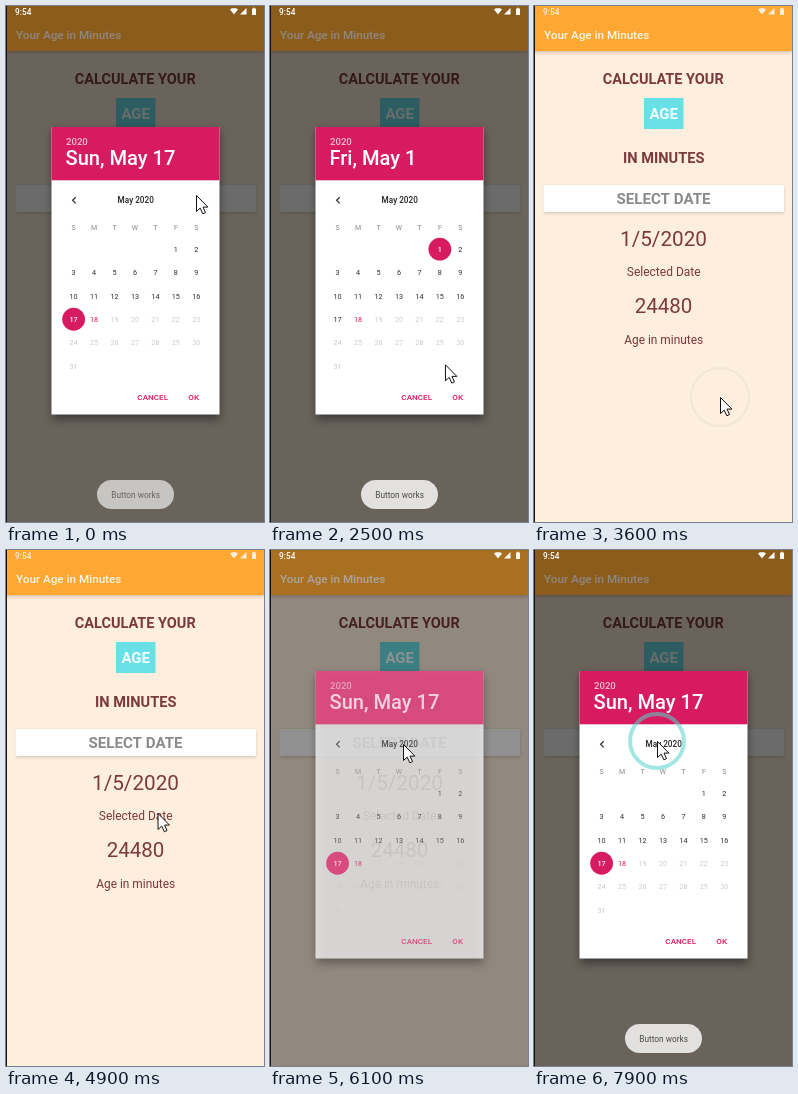
Recreate the animation shown at these times as an HTML page with a canvas. Size 258 by 516 pixels, loop 8000 ms.

```html
<!DOCTYPE html>
<html lang="en">
<head>
<meta charset="utf-8">
<title>Your Age in Minutes</title>
<style>
  html, body { margin: 0; width: 100%; height: 100%; overflow: hidden; background: #feeedd; }
  canvas { display: block; width: 258px; height: 516px; }
</style>
</head>
<body>
<canvas id="stage" width="258" height="516"></canvas>
<script>
const ctx = document.getElementById('stage').getContext('2d');
const LOOP = 8000, PINK = '#d81b60', MAROON = '#7b3a3c';

// Cursor stops: time, x, y
const cursorPath = [
  [0, 190, 189], [400, 200, 113], [850, 192, 176], [1250, 169, 224], [1380, 169, 224],
  [1500, 169, 238], [2100, 169, 238], [2520, 175, 359], [2780, 198, 382], [3000, 186, 391],
  [4450, 186, 391], [5200, 133, 194], [6250, 133, 194], [6600, 90, 219], [6800, 65, 222],
  [7150, 98, 204], [7500, 123, 191], [8000, 123, 191]
];
const clicks = [1720, 3150, 5350, 7850];

const ramp = (t, from, to) => Math.max(0, Math.min(1, (t - from) / (to - from)));
const ease = p => p * p * (3 - 2 * p);

function cursorAt(t) {
  const i = cursorPath.findIndex(stop => stop[0] > t);
  const [t0, x0, y0] = cursorPath[i - 1], [t1, x1, y1] = cursorPath[i];
  const p = ease(ramp(t, t0, t1));
  return [x0 + (x1 - x0) * p, y0 + (y1 - y0) * p];
}

function rect(x, y, w, h, color) {
  ctx.fillStyle = color;
  ctx.fillRect(x, y, w, h);
}

function text(str, x, y, size, color, weight = 400, align = 'center') {
  ctx.font = `${weight} ${size}px Roboto, sans-serif`;
  ctx.textAlign = align;
  ctx.fillStyle = color;
  ctx.fillText(str, x, y);
}

function disc(x, y, r, color) {
  ctx.fillStyle = color;
  ctx.beginPath();
  ctx.arc(x, y, r, 0, 7);
  ctx.fill();
}

function ring(x, y, r, width, color, dash = []) {
  ctx.strokeStyle = color;
  ctx.lineWidth = width;
  ctx.setLineDash(dash);
  ctx.beginPath();
  ctx.arc(x, y, r, 0, 2 * Math.PI);
  ctx.stroke();
  ctx.setLineDash([]);
}

function polygon(points, color) {
  ctx.fillStyle = color;
  ctx.beginPath();
  points.forEach(p => ctx.lineTo(...p));
  ctx.closePath();
  ctx.fill();
}

function withShadow(color, blur, dy, draw) {
  ctx.save();
  ctx.shadowColor = color;
  ctx.shadowBlur = blur;
  ctx.shadowOffsetY = dy;
  draw();
  ctx.restore();
}

function drawPage(pressed) {
  rect(0, 0, 258, 516, '#feeedd');
  withShadow('rgba(120,70,20,.35)', 4, 1, () => rect(0, 0, 258, 45, '#ffa733'));
  text('Your Age in Minutes', 10, 33, 11.7, '#fff6e8', 500, 'left');
  text('CALCULATE YOUR', 129.2, 78.3, 14.5, MAROON, 700);
  rect(110, 92, 39.5, 31, '#69dfe6');
  text('AGE', 129.7, 113.2, 15, '#f4ffff', 700);
  text('IN MINUTES', 129.7, 156.6, 14.6, MAROON, 700);
  withShadow(`rgba(90,70,50,${pressed ? .55 : .3})`, pressed ? 5 : 3, pressed ? 2 : 1,
    () => rect(9.5, 179, 240.5, 27, '#fff'));
  text('SELECT DATE', 129.5, 198.2, 15.1, '#8b8b8b', 700);
  text('1/5/2020', 129.5, 240.3, 20.7, MAROON);
  text('Selected Date', 129.7, 270.3, 12, MAROON);
  text('24480', 129.5, 307.3, 20.5, MAROON);
  text('Age in minutes', 129.7, 337.5, 11.9, MAROON);
}

function drawStatus(bright) {
  const color = `rgba(255,255,255,${.82 + .18 * bright})`;
  text('9:54', 9, 8.6, 8.3, color, 500, 'left');
  polygon([[224, 3.4], [226, 2.2], [230, 2.2], [232, 3.4], [228, 8.6]], color);
  polygon([[240.5, 2], [240.5, 8.6], [234, 8.6]], color);
  rect(246, 2.6, 4, 6.4, color);
  rect(247, 1.8, 2, 1, color);
}

function drawDialog(selected, okPressed) {
  withShadow('rgba(0,0,0,.45)', 9, 4, () => rect(45.5, 121, 168, 287.5, '#fff'));
  rect(45.5, 121, 168, 53.3, PINK);
  text('2020', 60, 138.6, 9.6, '#f2bfd1', 500, 'left');
  text(selected === 1 ? 'Fri, May 1' : 'Sun, May 17', 59.5, 159.4, 20.1, '#fff', 500, 'left');
  text('May 2020', 129.7, 197.2, 8.2, '#222', 500);

  ctx.strokeStyle = '#222';
  ctx.lineWidth = 1.2;
  ctx.beginPath();
  ctx.moveTo(69.7, 191.2);
  ctx.lineTo(66.6, 194.3);
  ctx.lineTo(69.7, 197.4);
  ctx.stroke();

  const columnX = c => 67.6 + 20.45 * c;
  [...'SMTWTFS'].forEach((d, c) => text(d, columnX(c), 223.6, 7, '#858585'));
  for (let day = 1; day <= 31; day++) {
    const cell = day + 4;
    const x = columnX(cell % 7), y = 243.2 + 23.35 * Math.floor(cell / 7);
    const chosen = day === selected;
    if (chosen) disc(x, y, 11.4, PINK);
    const color = chosen ? '#fff' : day === 18 ? PINK : day > 18 ? '#cbcbcb' : '#2b2b2b';
    text(day, x, y + 2.6, 7.2, color, chosen ? 500 : 400);
  }
  if (okPressed) disc(187.5, 391, 14, '#dedede');
  text('CANCEL', 146.7, 393.5, 8.1, PINK, 500);
  text('OK', 187.7, 393.5, 8.1, PINK, 500);
}

function drawToast() {
  ctx.fillStyle = '#e2e1df';
  ctx.beginPath();
  ctx.roundRect(91, 474, 77, 29, 14.5);
  ctx.fill();
  text('Button works', 129.6, 491.8, 8.3, '#4a4a4a');
}

// A thick ring closes in on press, a thin one spreads on release.
function drawClick(age, x, y) {
  if (age <= 0 || age >= 500) return;
  if (age < 330) {
    const r = 29.5 - 12 * ramp(age, 0, 240);
    ctx.globalAlpha = (.55 + .4 * ramp(age, 50, 200)) * (1 - ramp(age, 280, 330));
    ring(x, y, r, 4 + 1.5 * ramp(age, 50, 200), '#58d3c9');
    if (age > 120) ring(x, y, r, 4, '#36bdb4', [1, 1.6]);
  }
  if (age > 150) {
    ctx.globalAlpha = .85 * (1 - ramp(age, 220, 500));
    ring(x, y, 20 + 9.5 * Math.sqrt(ramp(age, 150, 480)), 2, age < 380 ? '#5fd0c8' : '#a9bdb0');
  }
  ctx.globalAlpha = 1;
}

function drawCursor(x, y) {
  ctx.save();
  ctx.translate(x + .5, y + .5);
  const arrow = [[0, 0], [0, 16], [3.7, 12.6], [6.3, 18.3], [9, 17.1], [6.5, 11.6], [11.4, 11.6]];
  polygon(arrow, '#fff');
  ctx.strokeStyle = '#111';
  ctx.lineWidth = 1;
  ctx.stroke();
  ctx.restore();
}

function render(t) {
  const shown = t < 4500 ? 1 - ramp(t, 3420, 3570) : ramp(t, 5960, 6150);
  const toast = t < 4500
    ? (.78 + .22 * ramp(t, 0, 300)) * (1 - ramp(t, 3200, 3540))
    : ramp(t, 6200, 6500);
  const selected = t >= 1950 && t < 4500 ? 1 : 17;

  ctx.globalAlpha = 1;
  drawPage(t > 5400 && t < 6100);
  rect(0, 0, 258, 45, `rgba(0,0,0,${.45 * shown})`);
  rect(0, 45, 258, 471, `rgba(0,0,0,${.58 * shown})`);
  drawStatus(shown);
  rect(0, 0, 1, 516, '#15120f');

  if (shown) {
    ctx.globalAlpha = shown;
    drawDialog(selected, t > 3260 && t < 3600);
  }
  if (toast) {
    ctx.globalAlpha = toast;
    drawToast();
  }
  ctx.globalAlpha = 1;

  const [x, y] = cursorAt(t);
  clicks.forEach(start => drawClick(t - start, x, y));
  drawCursor(x, y);
}

const begin = performance.now();
function tick() {
  render((performance.now() - begin) % LOOP);
  requestAnimationFrame(tick);
}
tick();
</script>
</body>
</html>
```
